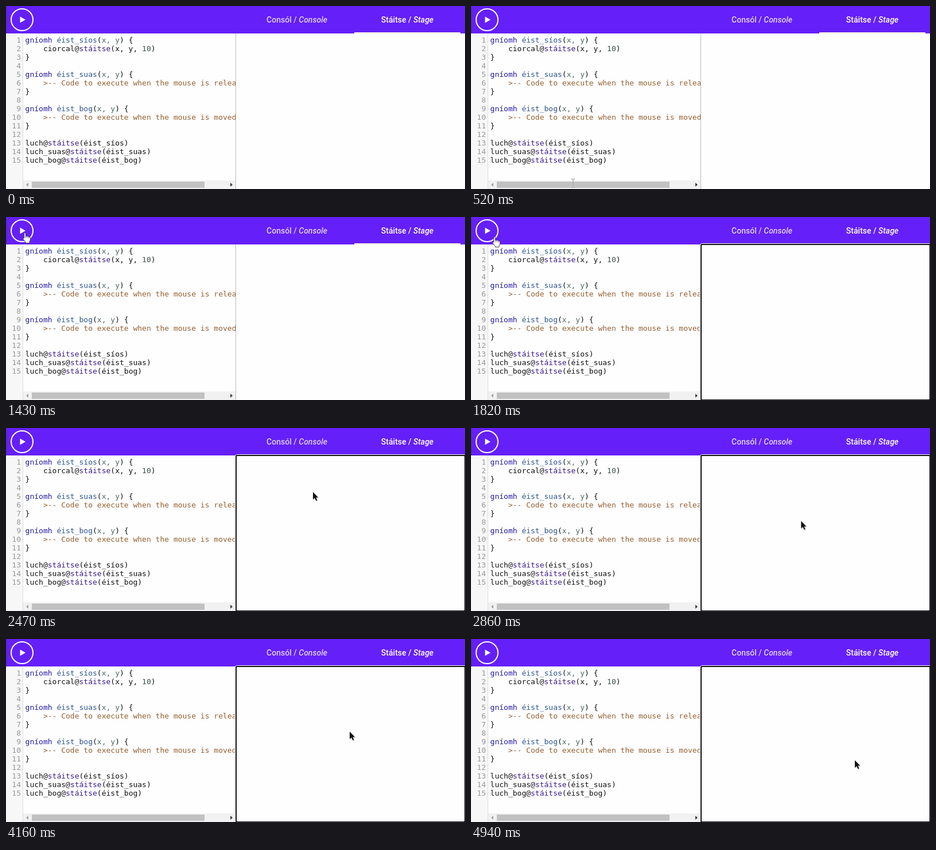
Write an HTML page that moves like this. It is 800x320 px and loops after 5200 ms.

```html
<!DOCTYPE html>
<html lang="ga">
<head>
<meta charset="utf-8">
<title>Stáitse</title>
<style>
  html, body { margin: 0; width: 100%; height: 100%; overflow: hidden; background: #fefefe; }
  body > * { position: absolute; }
  #bar { left: 0; top: 0; width: 800px; height: 48px; background: #651ff8; box-shadow: inset 1px 0 #46308c; }
  .tab {
    position: absolute; top: 0; width: 185px; height: 48px; text-align: center;
    font: 500 14px/48px Roboto, sans-serif; color: #e0d2fe;
  }
  #console { left: 414.5px; }
  #stage { left: 607px; color: #fff; }
  #stage::after {
    content: ""; position: absolute; left: 0; bottom: 0;
    width: 185px; height: 2px; background: #fffbe4;
  }
  #editor { left: 0; top: 48px; width: 400px; height: 272px; overflow: hidden; background: #fefefe; }
  #gutter { position: absolute; width: 29px; height: 272px; background: #f7f7f7; border-right: 1px solid #ddd; }
  pre { position: absolute; top: 4px; margin: 0; font: 13px/15px "DejaVu Sans Mono", monospace; color: #111; }
  #nums { right: 374px; text-align: right; color: #999; }
  #code { left: 33.6px; }
  .k { color: #2218a0; }
  .d { color: #2c5590; }
  .p { color: #4f6868; }
  .b { color: #3a1a8c; }
  .n { color: #3f5048; }
  .c { color: #955f30; }
  #art { left: 0; top: 0; }

  #ring { animation: focus 5200ms step-end infinite; }
  #cursor { animation: move 5200ms step-end infinite; }
  #beam { animation: beam 5200ms step-end infinite; }
  #hand { animation: hand 5200ms step-end infinite; }
  #arrow { animation: arrow 5200ms step-end infinite; }

  @keyframes focus { 0% { opacity: 0 } 30%, 100% { opacity: 1 } }
  /* one step every 130 ms, which is 2.5% of the loop */
  @keyframes move {
    0% { transform: translate(178px, 310px) }
    10% { transform: translate(178px, 310px); animation-timing-function: steps(3) }
    17.5% { transform: translate(55px, 64px); animation-timing-function: steps(2) }
    22.5% { transform: translate(33px, 28px) }
    30% { transform: translate(33px, 28px); animation-timing-function: steps(2) }
    35% { transform: translate(41px, 35px); animation-timing-function: steps(5) }
    47.5% { transform: translate(535px, 112px); animation-timing-function: steps(7) }
    65% { transform: translate(629px, 230px); animation-timing-function: steps(6) }
    80% { transform: translate(599px, 162px); animation-timing-function: steps(6) }
    95%, 100% { transform: translate(669px, 212px) }
  }
  @keyframes beam {
    0%, 20% { opacity: 0 }
    10%, 37.5% { opacity: 1 }
    45%, 100% { opacity: 0 }
  }
  @keyframes hand { 0% { opacity: 0 } 20% { opacity: 1 } 37.5%, 100% { opacity: 0 } }
  @keyframes arrow { 0% { opacity: 0 } 45%, 100% { opacity: 1 } }
</style>
</head>
<body>
<div id="editor">
  <div id="gutter"></div>
  <pre id="nums">
1
2
3
4
5
6
7
8
9
10
11
12
13
14
15</pre>
  <pre id="code">
<span class="k">gníomh</span> <span class="d">éist_síos</span>(<span class="p">x, y</span>) {
    ciorcal@<span class="b">stáitse</span>(x, y, <span class="n">10</span>)
}

<span class="k">gníomh</span> <span class="d">éist_suas</span>(<span class="p">x, y</span>) {
    <span class="c">&gt;-- Code to execute when the mouse is released</span>
}

<span class="k">gníomh</span> <span class="d">éist_bog</span>(<span class="p">x, y</span>) {
    <span class="c">&gt;-- Code to execute when the mouse is moved</span>
}

luch@<span class="b">stáitse</span>(éist_síos)
luch_suas@<span class="b">stáitse</span>(éist_suas)
luch_bog@<span class="b">stáitse</span>(éist_bog)</pre>
</div>
<div id="bar">
  <div class="tab" id="console">Consól / <i>Console</i></div>
  <div class="tab" id="stage">Stáitse / <i>Stage</i></div>
</div>
<svg id="art" width="800" height="320" viewBox="0 0 800 320">
  <circle cx="28" cy="24" r="19" fill="none" stroke="#fff" stroke-width="2"/>
  <path d="M24.5 18.5V29.5L34 24Z" fill="#fff"/>

  <rect x="30" y="305" width="370" height="15" fill="#f1f1f1"/>
  <rect x="45" y="307" width="301" height="11" fill="#c1c1c1"/>
  <path d="M39 309V316L35 312.5Z" fill="#a3a3a3"/>
  <path d="M391 309V316L395 312.5Z" fill="#404040"/>
  <path d="M400.5 48V320" stroke="#bbb"/>

  <g id="ring" fill="none">
    <rect x="399.5" y="46.5" width="402" height="275" rx="3" stroke="#fff"/>
    <rect x="401" y="48" width="399" height="272" rx="2" fill="#fefefe" stroke="#101010" stroke-width="2"/>
  </g>

  <g id="cursor">
    <g id="beam" fill="none">
      <path d="M-3 -7.5H-1L0 -6.5L1 -7.5H3M0 -6.5V6.5M-3 7.5H-1L0 6.5L1 7.5H3" stroke="#fff" stroke-width="2.5" opacity=".6"/>
      <path d="M-3 -7.5H-1L0 -6.5L1 -7.5H3M0 -6.5V6.5M-3 7.5H-1L0 6.5L1 7.5H3" stroke="#777"/>
    </g>
    <g id="hand" fill="#fff" stroke="#444" stroke-linejoin="round">
      <path d="M-1.3 1Q-1.3 -.5 0 -.5T1.3 1V6Q2.5 4.8 4 6Q5.5 5.2 6.7 6.8Q9.5 6.3 9.5 9V12L8 15V17.5H1V15.5L-3.3 10.5Q-3.5 8.3 -1.3 9Z"/>
      <path d="M1.3 6V9M4 6.2V9M6.7 7V9.5" fill="none" stroke-width=".7"/>
    </g>
    <g id="arrow">
      <path d="M1 1.5V14.5L4 11.7L6.3 16.7L8.6 15.7L6.4 11H10.5Z" fill="#000" opacity=".18"/>
      <path d="M0 0V13L3 10.2L5.3 15.2L7.5 14.2L5.3 9.4H9.3Z" fill="#111" stroke="#fff" paint-order="stroke"/>
    </g>
  </g>
</svg>
</body>
</html>
```
